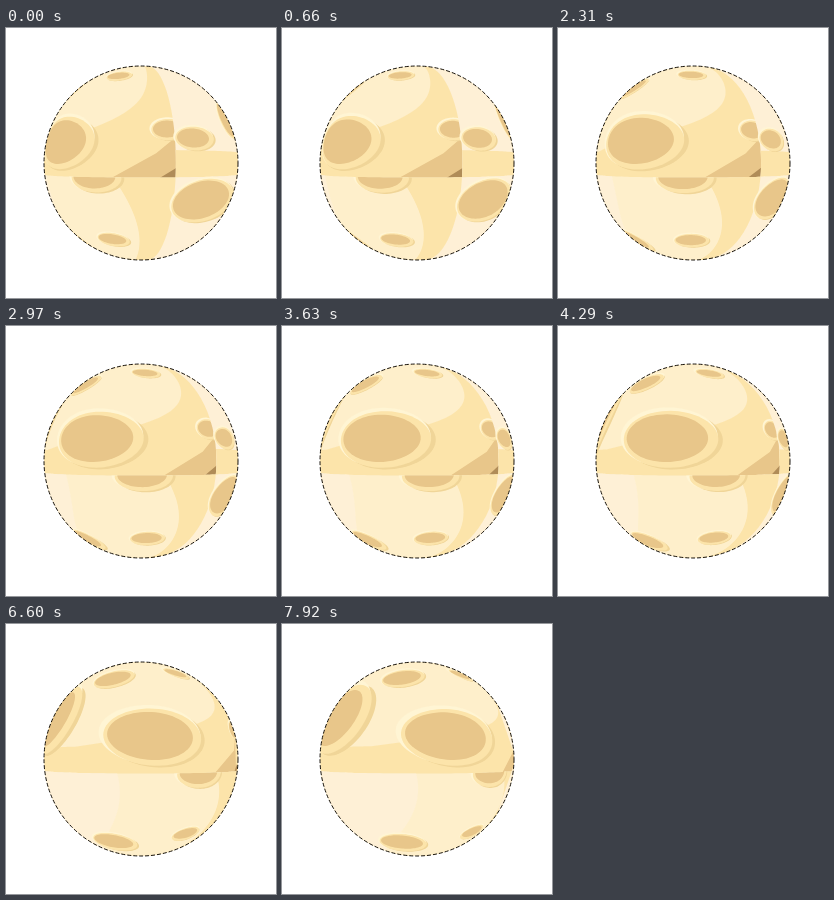
Animation of 270x270 px, one loop 8000 ms. Source, as an HTML page with a canvas:

```html
<!DOCTYPE html>
<html lang="en">
<head>
<meta charset="utf-8">
<title>Turning moon</title>
<style>
html, body { margin: 0; width: 100%; height: 100%; overflow: hidden; background: #fff; }
canvas { display: block; width: 100vmin; height: 100vmin; }
</style>
</head>
<body>
<canvas id="stage" width="270" height="270"></canvas>
<script>
const ctx = document.getElementById('stage').getContext('2d');
const C = 135, R = 97, DIST = 4, ZOOM = Math.sqrt(DIST * DIST - 1);
const RAD = Math.PI / 180;
const LOOP = 8000, STEP = 330, SPEED = 8.15 * RAD; // radians per second
const SEAM = 16.4, RIDGE = 6.7, FAR_EAST = 110, FAR_WEST = -140; // degrees
const CREAM = '#feefcb', PALE = '#fef0d6', YELLOW = '#fce4aa',
      TAN = '#e8c68a', DARK = '#b08c58', LIGHT = '#fff5d4', SHADE = '#f0d598';

// Longitude grows to the right, latitude downwards.
function globe(lon, lat) {
  const a = lon * RAD, b = lat * RAD;
  return [Math.cos(b) * Math.sin(a), Math.sin(b), Math.cos(b) * Math.cos(a)];
}

function spin([x, y, z], a) {
  const c = Math.cos(a), s = Math.sin(a);
  return [x * c + z * s, y, z * c - x * s];
}

// Stage point seen at time t (seconds) -> point on the unit sphere.
function lift(px, py, t) {
  let u = (px - C) / R, v = (py - C) / R;
  const fit = Math.min(1, 0.999 / (Math.hypot(u, v) || 1)) / ZOOM;
  u *= fit;
  v *= fit;
  const k = 1 + u * u + v * v;
  const s = (DIST - Math.sqrt(Math.max(0, DIST * DIST - k * ZOOM * ZOOM))) / k;
  return spin([u * s, v * s, DIST - s], -SPEED * t);
}

// Sphere point -> stage; hidden points slide onto the limb.
function project(p, angle) {
  const [x, y, z] = spin(p, angle);
  const f = z < 1 / DIST ? R * 1.02 / (Math.hypot(x, y) || 1) : R * ZOOM / (DIST - z);
  return [C + x * f, C + y * f];
}

function patch(color, corners) {
  return { color, pts: corners.map(([lon, lat]) => globe(lon, lat)) };
}

// Region between a curve edge(lat) and a fixed longitude.
function sweep(color, top, bottom, edge, far) {
  const near = [], back = [], n = 40;
  for (let i = 0; i <= n; i++) {
    const lat = top + (bottom - top) * i / n;
    near.push([edge(lat), lat]);
    back.unshift([far, lat]);
  }
  const side = (from, to, lat) =>
    Array.from({ length: n }, (_, i) => [from + (to - from) * i / n, lat]);
  return patch(color, [...near, ...side(edge(bottom), far, bottom),
    ...back, ...side(far, edge(top), top)]);
}

function oval(color, t, cx, cy, rx, ry, tilt) {
  const pts = [], c = Math.cos(tilt), s = Math.sin(tilt);
  for (let i = 0; i < 72; i++) {
    const x = rx * Math.cos(i * 5 * RAD), y = ry * Math.sin(i * 5 * RAD);
    pts.push(lift(cx + x * c - y * s, cy + x * s + y * c, t));
  }
  return { color, pts };
}

// Placed as it looks on the stage at time t.
function crater(t, cx, cy, rx, ry, deg = 0, rim = 0.2) {
  const w = Math.min(rx, ry) * rim + 1;
  const ring = (color, dx, dy, gx, gy) =>
    oval(color, t, cx + w * dx, cy + w * dy, rx + w * gx, ry + w * gy, deg * RAD);
  return [
    ring(SHADE, 1.1, 0.4, 1.2, 0.9),
    ring(LIGHT, 0.1, -0.2, 1.4, 1),
    ring(YELLOW, 0.5, 0.2, 1.1, 0.8),
    ring(TAN, 0, 0, 1e-3, 1e-3)
  ];
}

const eastSide = sweep(PALE, -85, 85, () => SEAM, FAR_EAST);

const upper = [
  sweep(CREAM, -80, -6, lat => 6 - 46 * Math.exp((lat + 13) / 10), FAR_WEST),
  patch(TAN, [[18, -13], [7, -4.5], [-14, 7], [18, 10]]),
  patch(DARK, [[8.5, 7], [18, 1.5], [18, 8]]),
  ...crater(0, 161, 101, 14, 8.5),
  ...crater(5.61, 129, 112, 43, 24, 2),
  ...crater(7.92, 58, 94, 33, 14, -54, 0.4),
  ...crater(7.92, 120, 54, 19, 6.5, -8),
  ...crater(1.65, 127, 47, 12, 3.2),
  eastSide,
  sweep(YELLOW, -6, 9, () => SEAM, FAR_EAST),
  ...crater(0, 187, 110, 16, 9.5, 5),
  ...crater(0, 220, 91, 19, 5, 66)
];

const lower = [
  sweep(PALE, 0, 80, lat => -64 - 20 * ((lat - 14) / 34) ** 2, FAR_WEST),
  sweep(YELLOW, 0, 80, lat => -1 - 14 * ((lat - 42) / 38) ** 2, SEAM + 2),
  ...crater(1.65, 114, 149, 24, 12, 0, 0.25),
  ...crater(1.65, 125, 212, 15, 5, 3),
  ...crater(7.92, 120, 218, 21, 6.5, 5),
  eastSide,
  ...crater(0, 195, 172, 29, 18, -19, 0.1)
];

// The line where the two halves meet does not move as the ball turns.
const ridge = Array.from({ length: 75 }, (_, i) => project(globe(2 * i - 74, RIDGE), 0));

function trace(pts) {
  ctx.beginPath();
  pts.forEach(([x, y]) => ctx.lineTo(x, y));
  ctx.closePath();
}

function disc() {
  ctx.beginPath();
  ctx.arc(C, C, R, 0, Math.PI * 2);
}

function paint(base, shapes, angle) {
  ctx.fillStyle = base;
  ctx.fillRect(0, 0, 270, 270);
  for (const { color, pts } of shapes) {
    trace(pts.map(p => project(p, angle)));
    ctx.fillStyle = color;
    ctx.fill();
  }
}

function draw(now) {
  const angle = SPEED * Math.floor((now % LOOP) / STEP) * STEP / 1000;
  ctx.fillStyle = '#fff';
  ctx.fillRect(0, 0, 270, 270);

  ctx.save();
  disc();
  ctx.clip();
  paint(YELLOW, upper, angle);
  trace([[0, ridge[0][1]], ...ridge, [270, ridge[74][1]], [270, 270], [0, 270]]);
  ctx.clip();
  paint(CREAM, lower, angle);
  ctx.restore();

  disc();
  ctx.lineWidth = 1;
  ctx.setLineDash([4, 2]);
  ctx.strokeStyle = '#14100a';
  ctx.stroke();
}

const start = performance.now();
function tick() {
  draw(performance.now() - start);
  requestAnimationFrame(tick);
}
tick();
</script>
</body>
</html>
```
